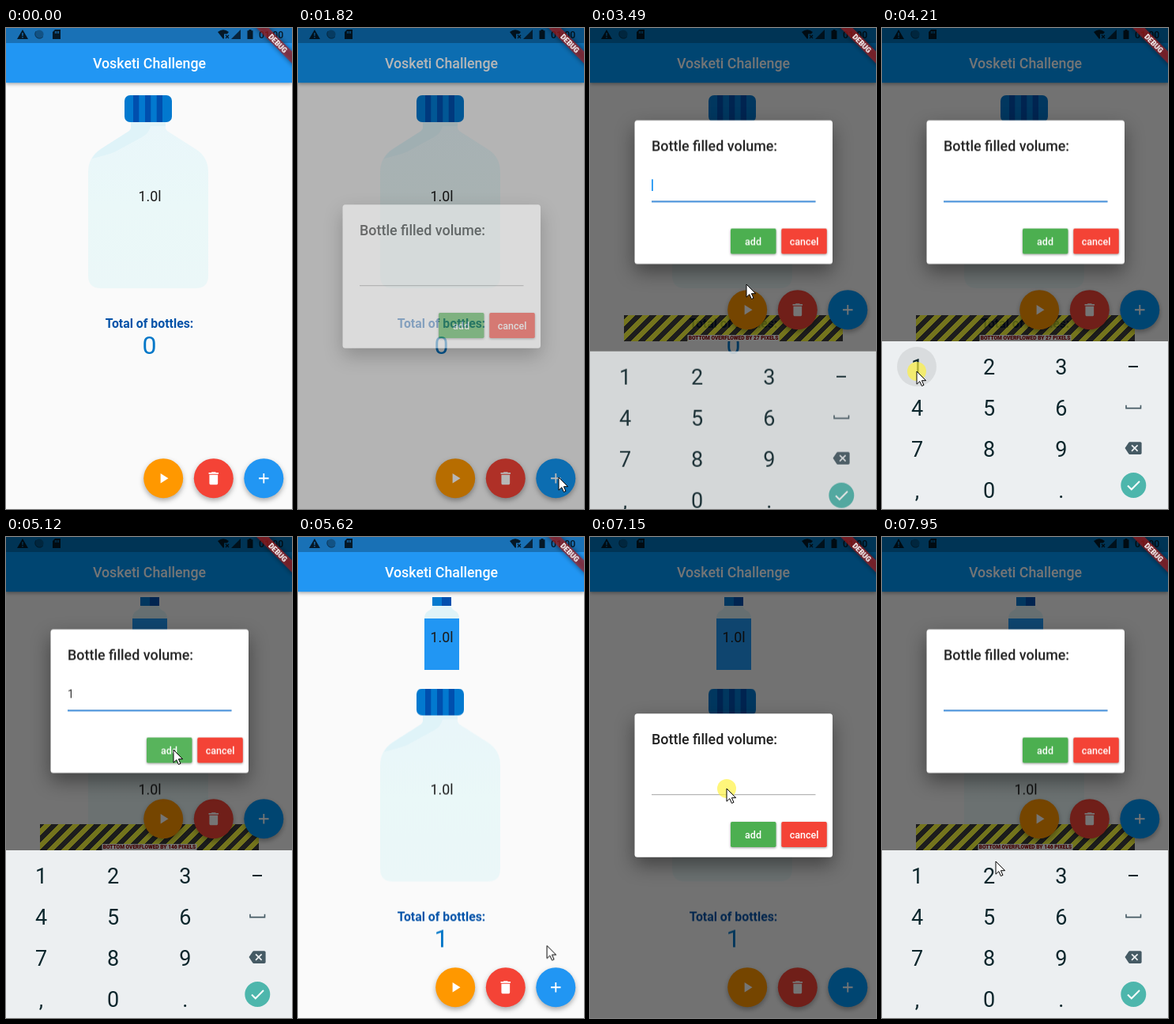
Write an HTML page that moves like this. It is 362 px wide and 608 px high and loops after 8000 ms.

```html
<!DOCTYPE html>
<html lang="en">
<head>
<meta charset="utf-8">
<title>Bottle counter</title>
<style>
  html, body { margin: 0; width: 100%; height: 100%; overflow: hidden; background: #fafafa; }
  svg { display: block; font-family: Roboto, sans-serif; }
  .mid { text-anchor: middle; }
  .white { fill: #fff; }
  .volume { font-size: 17.8px; fill: #1b1b1b; }
  .total { font-size: 15.84px; font-weight: 700; fill: #0352a8; }
  .count { font-size: 32px; fill: #0277c8; }
  .button { font-size: 12.5px; font-weight: 500; }
  .warn { font-size: 6.6px; font-weight: 800; fill: #900000; }
  .key { font-size: 27px; fill: #0c262c; }
  .raised { filter: drop-shadow(0 3px 3px rgba(0,0,0,.32)); }
  .low { filter: drop-shadow(0 1.5px 1.5px rgba(0,0,0,.4)); }
  .bar { filter: drop-shadow(0 2px 2px rgba(0,0,0,.3)); }
  .card { filter: drop-shadow(0 10px 12px rgba(0,0,0,.42)); }
  .soft { filter: blur(3px); }
</style>
</head>
<body>
<svg width="362" height="608" viewBox="0 0 362 608">
  <defs>
    <linearGradient id="hazard" gradientUnits="userSpaceOnUse" x1="0" y1="0" x2="10" y2="10"
      spreadMethod="repeat" gradientTransform="translate(-2.3 -2.1) scale(.8946)">
      <stop offset=".25" stop-color="#000"/><stop offset=".25" stop-color="#ff0"/>
      <stop offset=".75" stop-color="#ff0"/><stop offset=".75" stop-color="#000"/>
    </linearGradient>
    <linearGradient id="glass" x1="0" y1="0" x2="0" y2="1">
      <stop offset="0" stop-color="#e9f6fa"/><stop offset=".5" stop-color="#eaf8f8"/><stop offset="1" stop-color="#ebf7f8"/>
    </linearGradient>
  </defs>

  <rect width="362" height="608" fill="#fafafa"/>

  <g id="stack">
    <path fill="url(#glass)" d="M158 118H202V127Q203 130 207 132L240 153Q256 163 256 182V313Q256 329 240 329H120Q104 329 104 313V182Q104 163 120 153L153 132Q157 130 158 127Z"/>
    <path fill="#dff3f8" d="M158 118H202V124H183Q181 133 172 138L137 157Q126 161 109 165Q113 158 120 153L153 132Q157 130 158 127Z"/>
    <rect x="150" y="85" width="60" height="34" rx="7" fill="#0279cf"/>
    <path fill="#004fae" d="M161 85h7.3v34h-7.3zM176 85h7.3v34h-7.3zM190.7 85h7.3v34h-7.3z"/>
    <text class="volume mid" x="182" y="219">1.0l</text>
    <text class="total mid" x="181.5" y="379">Total of bottles:</text>
    <text id="none" class="count mid" x="181.4" y="412">0</text>
    <text id="one" class="count mid" x="181.4" y="412">1</text>
  </g>

  <g id="small">
    <path fill="#dff3f8" d="M171 86H193Q194 91 200 94Q204 97 204 103H160Q160 97 164 94Q170 91 171 86Z"/>
    <rect x="160" y="103" width="44" height="65" fill="#2196f3"/>
    <rect x="170" y="76" width="24" height="11" fill="#0279cf"/>
    <rect x="182" y="76" width="12" height="11" fill="#004fae"/>
    <text class="volume mid" x="182" y="133">1.0l</text>
  </g>

  <g id="overflow">
    <rect x="43" y="363" width="277" height="33" fill="url(#hazard)" opacity=".75"/>
    <g id="over27">
      <rect x="123.5" y="388" width="116" height="8" fill="#fff"/>
      <text class="warn mid" x="181.5" y="394.4">BOTTOM OVERFLOWED BY 27 PIXELS</text>
    </g>
    <g id="over146">
      <rect x="121.5" y="388" width="120" height="8" fill="#fff"/>
      <text class="warn mid" x="181.5" y="394.4">BOTTOM OVERFLOWED BY 146 PIXELS</text>
    </g>
  </g>

  <g id="fabs"></g>

  <g class="bar"><rect id="appBar" width="362" height="69.2" fill="#2196f3"/></g>
  <text class="white mid" x="181.5" y="51" font-size="17.8" font-weight="500">Vosketi Challenge</text>

  <rect width="362" height="19" fill="#000" fill-opacity=".25"/>
  <g opacity=".78">
    <path fill-rule="evenodd" d="M21 2L28 14H14ZM20.3 6V10H21.7V6ZM20.3 11V12.5H21.7V11Z"/>
    <circle cx="42" cy="8" r="5.6" opacity=".35"/>
    <path d="M38 4A5.6 5.6 0 1 0 47 11" fill="none" stroke="#000" stroke-width="1" opacity=".5"/>
    <path fill-rule="evenodd" d="M62 2H69V14H59V5ZM62 4V7H63V4ZM64 4V7H65V4ZM66 4V7H67V4Z"/>
    <path d="M268 5Q275 -.5 282 5L280 7.5H276V13L275 14Z"/>
    <path d="M278 9l4 4m0 -4l-4 4" stroke="#000" stroke-width="1.3"/>
    <path d="M297 2V14H285Z" opacity=".85"/>
    <path d="M307.5 2H310.5V3.2H312.5V14H305.5V3.2H307.5Z"/>
    <text x="320" y="13" font-size="12.3" font-weight="500">01:00</text>
  </g>

  <rect id="scrim" width="362" height="608" fill="#000" fill-opacity=".54"/>

  <g id="fade"><g id="dialog">
    <rect class="card" x="56.5" y="223.3" width="250.5" height="181.5" rx="3.5" fill="#fff"/>
    <text x="78" y="262" font-size="17.9" font-weight="500" fill="#212121">Bottle filled volume:</text>
    <rect x="78" y="325.2" width="207.5" height="1" fill="#a5a5a5"/>
    <rect id="focus" x="78" y="325" width="207.5" height="1.8" fill="#3b8ee0"/>
    <text id="typed" x="78" y="309.5" font-size="14.1" fill="#333">1</text>
    <rect id="caret" x="78" y="297.5" width="1.8" height="14.5" fill="#2196f3"/>
    <rect class="low" x="178" y="360" width="57.5" height="32" rx="1.8" fill="#4caf50"/>
    <rect id="press" x="178" y="360" width="57.5" height="32" rx="1.8" fill="#fff" fill-opacity=".07"/>
    <rect class="low" x="242.3" y="360" width="57.5" height="32" rx="1.8" fill="#f44336"/>
    <text class="button white mid" x="206.5" y="380.6">add</text>
    <text class="button white mid" x="271" y="380.6">cancel</text>
  </g></g>

  <g id="keyboard">
    <rect y="396" width="362" height="214" fill="#eceff1"/>
    <circle id="keyPress" cx="44" cy="428" r="25" fill="#000" fill-opacity=".08"/>
    <g id="keys"></g>
    <path d="M312 428H324" stroke="#0c262c" stroke-width="2"/>
    <path d="M309 476.8V480.6H327.5V476.8" fill="none" stroke="#455a64" stroke-width="1.6"/>
    <path transform="translate(307.5 520.5) scale(.88)" fill="#455a64" d="M22 3H7c-.69 0-1.23.35-1.59.88L0 12l5.41 8.11c.36.53.9.89 1.59.89h15c1.1 0 2-.9 2-2V5c0-1.1-.9-2-2-2zm-3 12.59L17.59 17 14 13.41 10.41 17 9 15.59 12.59 12 9 8.41 10.41 7 14 10.59 17.59 7 19 8.41 15.41 12 19 15.59z"/>
    <circle cx="318.3" cy="578" r="16" fill="#4db6ac"/>
    <path d="M311 578.5L315.8 583.3L326 573" fill="none" stroke="#fff" stroke-width="2"/>
  </g>

  <g transform="translate(365.8 -2.1) rotate(45)">
    <rect class="soft" x="-36" y="25" width="72" height="10.8" fill-opacity=".5"/>
    <rect x="-36" y="25" width="72" height="10.8" fill="#b71c1c" fill-opacity=".63"/>
    <text class="white mid" y="33.7" font-size="9.1" font-weight="900">DEBUG</text>
  </g>

  <g id="pointer">
    <circle id="click" r="12" fill="#fff23c" fill-opacity=".68"/>
    <path d="M0 0V16.2L3.8 12.7L6.4 18.5L9 17.4L6.4 11.7H11.6Z" fill="#fff" stroke="#000" stroke-width="1"/>
  </g>
</svg>

<script>
const LOOP = 8000;
const $ = id => document.getElementById(id);

const icons = [
  ["play", 199.2, "#ff9800", "M8 5v14l11-7z"],
  ["clear", 262.8, "#f44336", "M6 19c0 1.1.9 2 2 2h8c1.1 0 2-.9 2-2V7H6v12zM19 4h-3.5l-1-1h-5l-1 1H5v2h14V4z"],
  ["plus", 326.3, "#2196f3", "M19 13h-6v6h-2v-6H5v-2h6V5h2v6h6v2z"]
];
$("fabs").innerHTML = icons.map(([id, x, color, d]) =>
  `<circle id="${id}" class="raised" cx="${x}" cy="569.2" r="25" fill="${color}"/>
   <path class="white" transform="translate(${x - 10.74} 558.5) scale(.895)" d="${d}"/>`).join("");

$("keys").innerHTML = [..."123456789,0."].map((key, i) =>
  `<text class="key mid" x="${44.5 + i % 3 * 91.2}" y="${438 + Math.floor(i / 3) * 52}">${key}</text>`).join("");

// Keys are [time, value, easing to the next key]; without easing the value holds.
function track(id, prop, keys) {
  const frames = keys.map(([t, value, easing = "step-end"]) =>
    ({ offset: t / LOOP, [prop]: value, easing }));
  if (keys.at(-1)[0] < LOOP) frames.push({ offset: 1, [prop]: keys.at(-1)[1] });
  $(id).animate(frames, { duration: LOOP, iterations: Infinity });
}
const move = (id, keys) => track(id, "transform",
  keys.map(([t, x, y, ease]) => [t, `translate(${x}px, ${y}px)`, ease]));
const show = (id, ...spans) => track(id, "opacity",
  [[0, spans[0][0] === 0 ? 1 : 0], ...spans.flatMap(([on, off]) => [[on, 1], [off, 0]])
    .filter(([t]) => t > 0)]);

const ADDED = 4940, SHIFT = 106.5;
const inset = [[3330, 5370], [7480, LOOP]];

// Page
move("stack", [[0, 0, 0], [ADDED, 0, SHIFT]]);
show("none", [0, ADDED]);
show("one", [ADDED, LOOP]);
show("small", [ADDED, LOOP]);
show("overflow", ...inset);
show("over27", [0, ADDED]);
show("over146", [ADDED, LOOP]);
move("fabs", [[0, 0, 0], ...inset.flatMap(([on, off]) => [[on, 0, -213], [off, 0, 0]]).slice(0, 3)]);

// Dialog; the blue surfaces deepen while it is open
const fade = [[0, 0], [1760, 0, "ease-out"], [1930, 1], [5250, 1, "ease-in"], [5400, 0],
  [5990, 0, "ease-out"], [6160, 1]];
for (const id of ["scrim", "fade"]) track(id, "opacity", fade);
for (const id of ["appBar", "plus"])
  track(id, "fill", fade.map(([t, on, ease]) => [t, on ? "#0098f8" : "#2196f3", ease]));
move("dialog", [[0, 0, 0], [3330, 0, 0, "ease-out"], [3430, 0, -SHIFT], [5420, 0, 0],
  [7480, 0, 0, "ease-out"], [7590, 0, -SHIFT]]);
show("focus", [3300, 5410], [7460, LOOP]);
show("typed", [4270, 5410]);
show("caret", [3330, 3860], [4270, 4770], [7460, 7890]);
move("caret", [[0, 0, 0], [4270, 8.5, 0], [5410, 0, 0]]);
show("press", [5060, 5400]);

// Keyboard
move("keyboard", [[0, 0, 60], [3410, 0, 60, "ease-out"], [3490, 0, 13, "ease-out"], [3560, 0, 0],
  [5310, 0, 0, "ease-in"], [5450, 0, 60], [7560, 0, 60, "ease-out"], [7710, 0, 0]]);
track("keyboard", "opacity", [[0, 0], [3410, 0, "linear"], [3490, .81, "linear"], [3560, 1],
  [5310, 1, "linear"], [5450, 0], [7560, 0, "linear"], [7710, 1]]);
show("keyPress", [4150, 4330]);

// Pointer
const glide = "ease-in-out";
show("pointer", [1280, LOOP]);
move("pointer", [
  [0, 358, 609], [1280, 352, 604, "ease-out"], [1560, 330, 568],
  [2200, 330, 568, "ease-in"], [2500, 258, 394, "ease-out"], [2900, 198, 319],
  [3300, 198, 319, "linear"], [3480, 198, 324], [3540, 198, 324, glide], [4060, 44, 434],
  [4330, 44, 434, glide], [4860, 212, 269],
  [5250, 212, 269, glide], [5620, 315, 516, "ease-out"], [5800, 328, 568],
  [6060, 328, 568, glide], [6540, 172, 328],
  [6720, 172, 328, glide], [7080, 173, 318],
  [7460, 173, 318, glide], [7920, 144, 410]
]);
show("click", [1590, 1720], [2930, 3050], [4090, 4230], [4880, 5040], [5820, 5950], [7090, 7270]);
</script>
</body>
</html>
```
